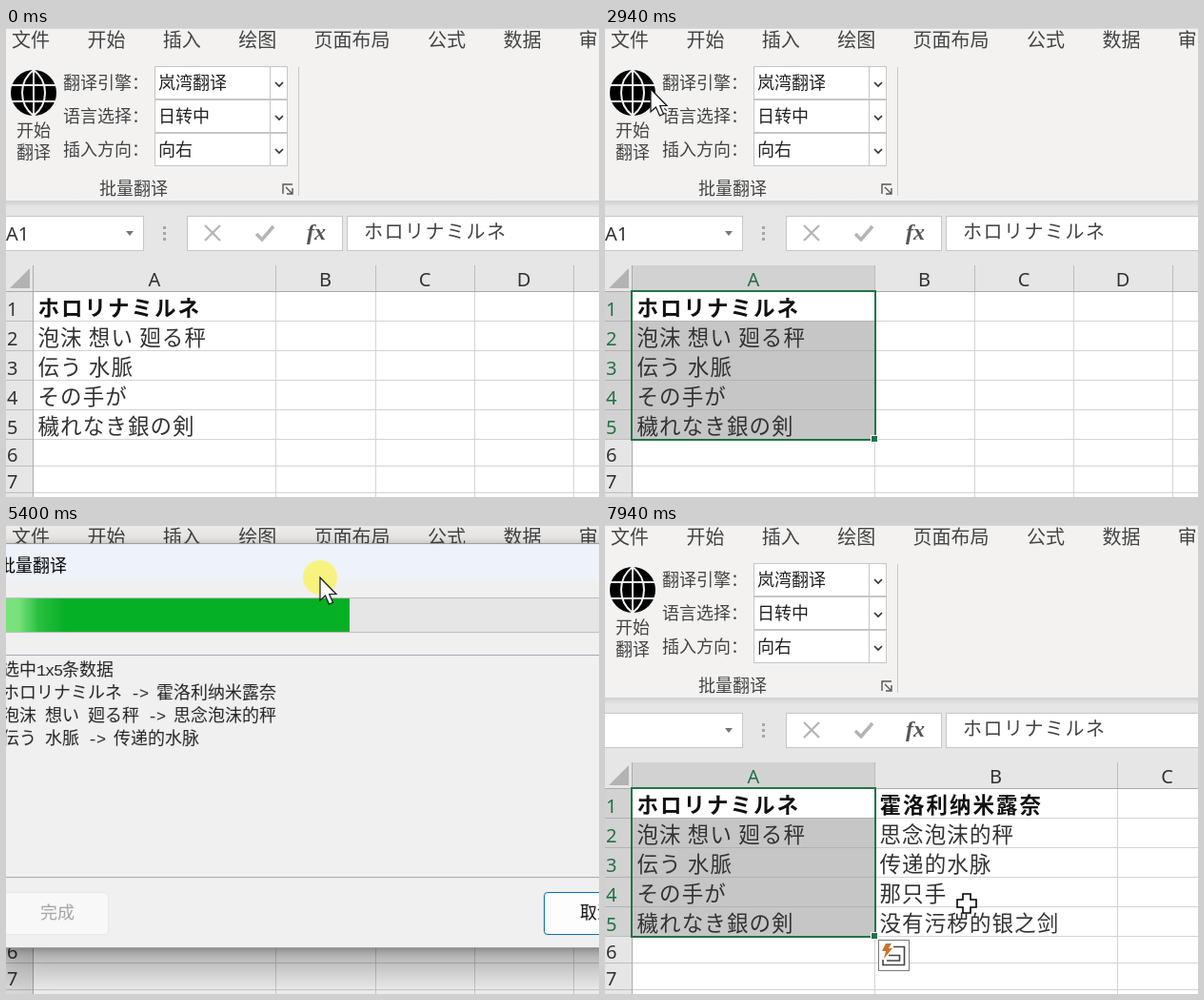
Write an HTML page that moves like this. It is 623x492 px and loops after 8 s.

```html
<!DOCTYPE html>
<html lang="zh">
<head>
<meta charset="utf-8">
<title>批量翻译</title>
<style>
html, body { margin: 0; width: 100%; height: 100%; overflow: hidden; background: #fff; }
#stage { position: relative; width: 623px; height: 492px; overflow: hidden; font-family: "Noto Sans CJK SC", "Noto Sans", sans-serif; }
#stage * { box-sizing: border-box; }
#sheet { position: absolute; left: 0; top: 0; }
.latin { font-family: "Noto Sans", "Open Sans", sans-serif; }
.cell { font-family: "Noto Sans CJK JP", "Noto Sans CJK SC", sans-serif; font-weight: 300; }
.entry { letter-spacing: 1.1px; }
.head { font-weight: 700; letter-spacing: 2px; }
#drag { position: absolute; left: 35px; top: -21px; }
#dialog {
  position: relative; width: 712px; height: 425px; border-radius: 10px; font-size: 18px;
  border: 1px solid #9a9a9a; transform-origin: 254px 168px;
  background: linear-gradient(#eef3fb 34px, #f0f0f0 44px);
  box-shadow: 0 22px 56px rgba(0,0,0,.42), 0 2px 8px rgba(0,0,0,.25);
}
#dialog > * { position: absolute; }
#title { left: 11px; top: 8px; line-height: 26px; }
#bar { left: 12px; top: 56px; width: 686px; height: 37px; border: 1px solid #bcbcbc; background: #e6e6e6; }
#fill { position: relative; height: 35px; background: #06b025; overflow: hidden; }
#shine {
  position: absolute; left: -60px; width: 120px; height: 35px;
  background: linear-gradient(90deg, #74e07800, #74e07855 25%, #78e27c 42%, #78e27c 58%, #74e07855 75%, #74e07800);
}
#log { left: 12px; top: 116px; width: 686px; height: 234px; border: 1px solid #a3a7ae; padding: 1px 2px; line-height: 24px; white-space: pre; font-family: "Noto Sans CJK JP", "Noto Sans CJK SC", sans-serif; font-weight: 300; color: #222; }
#log div { height: 24px; }
#log i { font: 17px/24px "Liberation Mono", monospace; letter-spacing: -1.2px; }
.btn { top: 365px; width: 110px; height: 45px; border: 1px solid; border-radius: 4px; line-height: 39px; padding-left: 2px; text-align: center; }
#done { left: 17px; }
#cancel { left: 584px; }
#cursor { position: absolute; left: 0; top: 0; }
#cursor svg { position: absolute; left: 0; top: 0; overflow: visible; }
</style>
</head>
<body>
<div id="stage">
  <svg id="sheet" width="623" height="492"></svg>
  <div id="drag"><div id="dialog">
    <div id="title">批量翻译</div>
    <div id="bar"><div id="fill"><div id="shine"></div></div></div>
    <div id="log"></div>
    <div class="btn" id="done">完成</div>
    <div class="btn" id="cancel">取消</div>
  </div></div>
  <div id="cursor"><svg width="1" height="1">
    <circle id="press" r="18" fill="#fbf24a" opacity=".7"/>
    <path id="plus" d="M-4-10H4V-4H10V4H4V10H-4V4H-10V-4H-4Z" fill="#fff" stroke="#000" stroke-width="1.6"/>
    <path id="arrow" d="M0 0V24L5.500 19 9.500 28 13.500 26.300 9.700 17.500H17Z" fill="#fff" stroke="#111" stroke-width="1.200"/>
  </svg></div>
</div>
<script>
const LOOP = 8000;
const $ = id => document.getElementById(id);
let css = '';

// Turns {ms: declarations} into a looping CSS animation on one element.
function track(id, timing, steps) {
  const times = Object.keys(steps);
  const frames = times.map(ms => `${ms / LOOP * 100}%{${steps[ms]}}`).join('');
  const last = steps[times[times.length - 1]];
  css += `@keyframes ${id}{${frames}100%{${last}}}#${id}{animation:${id} ${LOOP}ms ${timing} infinite}\n`;
}

// Switches an element on and off at the given times, starting hidden.
function blink(id, ...times) {
  const steps = { 0: 'visibility:hidden' };
  times.forEach((ms, i) => steps[ms] = 'visibility:' + (i % 2 ? 'hidden' : 'visible'));
  track(id, 'step-end', steps);
}

function move(id, points, timing = 'linear') {
  const steps = {};
  for (const [ms, x, y] of points) steps[ms] = `transform:translate(${x}px,${y}px)`;
  track(id, timing, steps);
}

const text = (x, cy, size, str, attrs = '') =>
  `<text x="${x}" y="${cy + size * .37}" font-size="${size}" ${attrs}>${str}</text>`;
const rect = (x, y, w, h, fill, attrs = '') =>
  `<rect x="${x}" y="${y}" width="${w}" height="${h}" fill="${fill}" ${attrs}/>`;
const frame = (x, y, w, h, stroke = '#c6c6c6') => rect(x + .5, y + .5, w, h, '#fff', `stroke="${stroke}"`);
const line = (d, stroke, width = 1) => `<path d="${d}" fill="none" stroke="${stroke}" stroke-width="${width}"/>`;
const group = (id, body) => `<g id="${id}">${body}</g>`;

const rowEdges = [276, 307, 338, 369, 400, 431, 459, 487, 516];
const rowMid = i => (rowEdges[i] + rowEdges[i + 1]) / 2 + 3;
const title = 'ホロリナミルネ';
const source = [title, '泡沫 想い 廻る秤', '伝う 水脈', 'その手が', '穢れなき銀の剣'];
const result = ['霍洛利纳米露奈', '思念泡沫的秤', '传递的水脉', '那只手', '没有污秽的银之剑'];

function ribbon() {
  const tabs = ['文件', '开始', '插入', '绘图', '页面布局', '公式', '数据', '审阅'];
  const fields = [['翻译引擎：', '岚湾翻译'], ['语言选择：', '日转中'], ['插入方向：', '向右']];
  let s = rect(0, 0, 623, 181, '#f3f2f1') + rect(0, 0, 623, 1, '#d8d8d8');
  let x = 6;
  for (const t of tabs) {
    s += text(x, 13, 20, t, 'fill="#444"');
    x += t.length * 20 + 39.4;
  }
  fields.forEach(([label, value], i) => {
    const y = 40 + i * 35, mid = y + 17;
    s += text(60, mid, 18, label, 'fill="#444"') + frame(156, y, 121, 34) + frame(277, y, 18, 34)
      + text(160, mid, 18, value, 'fill="#222"') + line(`M283 ${mid}l4 4 4-4`, '#333', 1.7);
  });
  s += '<circle cx="29" cy="68" r="24"/>'
    + line('M5 60H53M5 77H53M29 44V92M29 44C13 56 13 80 29 92M29 44C45 56 45 80 29 92', '#f3f2f1', 2);
  s += text(11, 107, 18, '开始', 'fill="#444"') + text(11, 130, 18, '翻译', 'fill="#444"')
    + text(98, 168, 18, '批量翻译', 'fill="#444"')
    + line('M291 174V164H301M294 167l6 6M301 168V174H295', '#555', 1.4)
    + line('M307.500 41V176', '#c8c6c4');
  return s;
}

function formulaBar() {
  let s = '<linearGradient id="edge" x2="0" y2="1"><stop stop-color="#cfcfcf"/><stop offset="1" stop-color="#e6e6e6"/></linearGradient>'
    + rect(0, 181, 623, 96, '#e6e6e6') + rect(0, 181, 623, 7, 'url(#edge)');
  s += frame(-2, 197, 146, 36) + frame(190, 197, 163, 36) + frame(358, 197, 270, 36);
  s += group('name', text(0, 216, 20, 'A1', 'class="latin" fill="#333"'));
  s += '<path d="M126 213h8l-4 5z" fill="#777"/>';
  s += [208, 214, 220].map(y => rect(165, y, 3, 3, '#a6a6a6')).join('');
  s += line('M209 207l16 16M225 207l-16 16', '#b4b4b4', 2.2) + line('M263 216l6 6 12-14', '#b4b4b4', 3.5);
  s += '<text x="316" y="222" font-family="Liberation Serif, serif" font-size="24" font-style="italic" font-weight="700" fill="#555">fx</text>';
  s += text(376, 214, 20, title, 'class="cell" fill="#444" letter-spacing="1.500"');
  return s;
}

const letter = (x, str, fill) => text(x, 264, 20, str, `class="latin" text-anchor="middle" fill="${fill}"`);
const rowLabels = (n, fill) => Array.from({ length: n }, (_, i) =>
  text(1, rowMid(i), 20, i + 1, `class="latin" fill="${fill}"`)).join('');

function columns(id, edges) {
  let s = '';
  edges.forEach((x, i) => {
    s += line(`M${x + .5} 249V276`, '#bdbdbd') + line(`M${x + .5} 277V492`, '#d4d4d4');
    const next = edges[i + 1] || x + 105;
    s += letter((x + next) / 2, 'BCDE'[i], '#333');
  });
  return group(id, s);
}

function grid() {
  let s = rect(0, 277, 28, 215, '#e6e6e6') + rect(28, 277, 595, 215, '#fff');
  s += '<path d="M25 252V273H4Z" fill="#b3b3b3"/>' + letter(156, 'A', '#333');
  s += rowEdges.slice(1).map(y => line(`M28 ${y + .5}H623`, '#d4d4d4') + line(`M0 ${y + .5}H28`, '#bdbdbd')).join('');
  s += columns('narrow', [283, 388, 492, 596]) + columns('wide', [283, 538]);
  s += line('M0 276.500H623M28.500 249V492', '#ababab') + rowLabels(7, '#333');
  return s;
}

function selection() {
  let s = rect(29, 249, 254, 27, '#d2d2d2') + letter(156, 'A', '#217346');
  s += rect(0, 277, 28, 154, '#d2d2d2') + rowLabels(5, '#217346');
  s += rect(29, 308, 254, 123, '#c6c6c6');
  s += rowEdges.slice(1, 5).map(y => line(`M0 ${y + .5}H283`, '#b2b2b2')).join('');
  s += line('M28 276H284V432H28Z', '#217346', 2) + rect(279, 427, 8, 8, '#fff') + rect(280, 428, 6, 6, '#217346');
  return group('selection', s);
}

const cells = (x, rows) => rows.map((t, i) =>
  text(x, rowMid(i) - 1, 22.5, t, `class="cell ${i ? 'entry' : 'head'}" fill="${i ? '#333' : '#111'}"`)).join('');

const quickIcon = () => group('quick', frame(287, 435, 32, 32, '#777')
  + line('M303 442.500H314.500V461.500H292V456M298 451.500H309.500V457H296', '#444', 1.6)
  + '<path d="M295 439h6l-3 5h4l-9 11 2-8h-4z" fill="#c8762b"/>');

$('sheet').innerHTML = ribbon() + formulaBar() + grid() + selection()
  + cells(33.5, source) + group('output', cells(288.5, result)) + quickIcon();

const lines = ['选中1x5条数据', ...source.map((t, i) => `${t} -> ${result[i]}`), '全部完成!'];
$('log').innerHTML = lines.map((t, i) =>
  `<div id="line${i}">${t.replace(/[ -~]+/g, m => `<i>${m.replace('>', '&gt;')}</i>`)}</div>`).join('');
[4250, 4650, 5200, 5700, 6100, 6160].forEach((ms, i) => blink('line' + (i + 1), ms));

blink('selection', 1020);
blink('quick', 1290, 2800, 7870);
blink('wide', 6300);
blink('output', 6300);
for (const id of ['narrow', 'name'])
  track(id, 'step-end', { 0: 'visibility:visible', 6300: 'visibility:hidden' });

blink('plus', 200, 2520, 7780);
blink('arrow', 2520, 7780);
blink('press', 1020, 1290, 2860, 2940, 5150, 5750, 7480, 7600);
move('cursor', [
  [0, 476, 482], [200, 476, 482], [960, 104, 291], [1640, 104, 291], [1690, 106, 296],
  [1850, 108, 300], [1990, 115, 308], [2110, 137, 314], [2250, 137, 314], [2800, 48, 64],
  [3530, 48, 64], [3740, 54, 84], [4000, 54, 84], [4700, 385, 15], [5150, 385, 15],
  [5400, 330, 55], [5700, 303, 67], [6000, 303, 67], [6400, 640, 340], [6850, 640, 340],
  [7420, 45, 424], [7640, 45, 424], [7920, 380, 397]
]);

move('drag', [[0, 0, 0], [5150, 0, 0], [5400, -55, 40], [5700, -82, 52]]);
const pose = (opacity, scale) => `opacity:${opacity};transform:scale(${scale})`;
track('dialog', 'linear', {
  0: pose(0, .91), 3600: pose(0, .91), 3760: pose(.82, .937), 3920: pose(1, 1),
  7650: pose(1, 1), 7830: pose(0, .92)
});

const widths = [[0, 0], [4250, 0], [4450, 137], [4650, 137], [4850, 196], [5050, 273], [5200, 273],
  [5400, 367], [5520, 410], [5700, 410], [5950, 547], [6100, 547], [6350, 684]];
track('fill', 'linear', Object.fromEntries(widths.map(([ms, w]) => [ms, `width:${w}px`])));
move('shine', [[0, -60, 0], [5120, -60, 0], [5400, 10, 0], [6500, 281, 0], [7700, 577, 0]]);

const enabled = border => `color:#111;background:#fdfdfd;border-color:${border}`;
const disabled = 'color:#a3a3a3;background:#f8f8f8;border-color:#e8e8e8';
track('done', 'step-end', { 0: disabled, 6200: enabled('#c8c8c8') });
track('cancel', 'step-end', { 0: enabled('#0067b4'), 6200: disabled });

const style = document.createElement('style');
style.textContent = css;
document.head.append(style);
</script>
</body>
</html>
```
